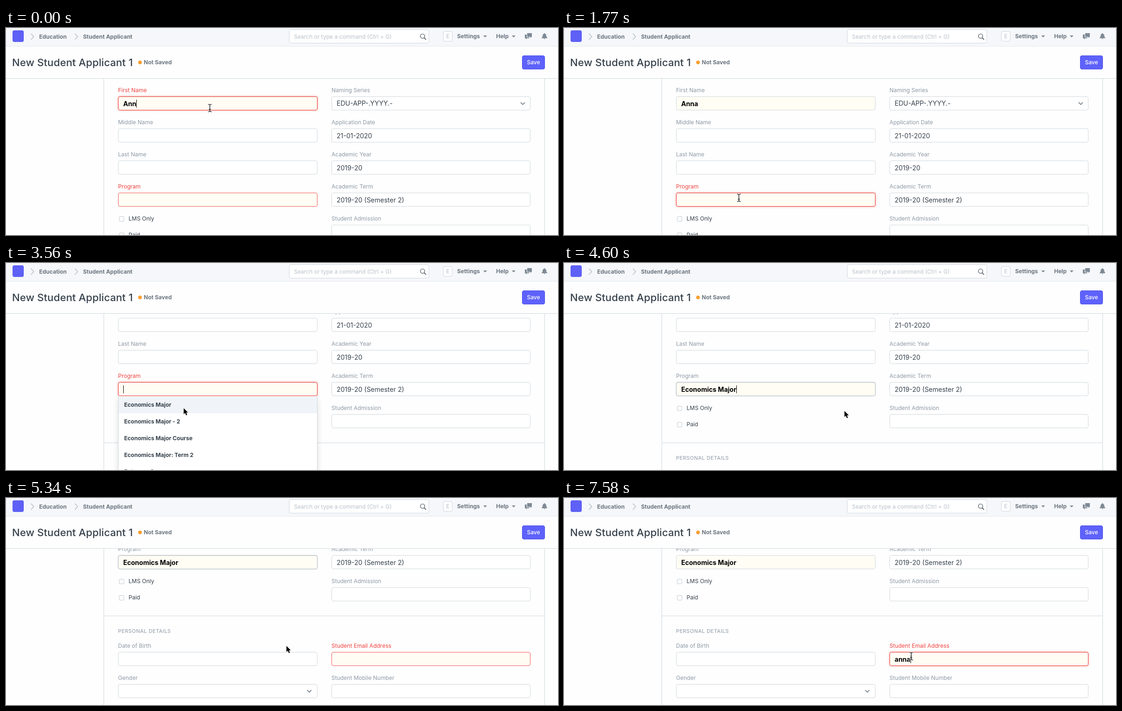
These frames come from a looping animation (1182 px wide and 445 px high, 8000 ms). An HTML page:

```html
<!DOCTYPE html>
<html lang="en">
<head>
<meta charset="utf-8">
<title>Student form</title>
<style>
  html, body { margin: 0; width: 100%; height: 100%; overflow: hidden; background: #fefefe; }
  body { font: 12px/20px Inter, "Open Sans", sans-serif; color: #36414c; cursor: default; }
  div, svg, .caret { position: absolute; box-sizing: border-box; }
  .text { white-space: pre; line-height: 20px; }
  .bold { font-weight: 700; color: #6c7680; }
  #stage { left: 0; top: 0; width: 1182px; height: 445px; overflow: hidden; background: #fefefe; }
  #bar { left: 0; top: 0; width: 1182px; height: 40px; background: #f5f7fa; border-bottom: 1px solid #e6eaee; }
  #head { left: 0; top: 40px; width: 1182px; height: 69px; border-bottom: 1px solid #d1d8dd; }
  #logo { left: 14px; top: 5px; width: 24px; height: 25px; border-radius: 4px; background: #5e60f6; }
  #search { left: 606px; top: 3px; width: 300px; height: 30px; border: 1px solid #d1d8dd; border-radius: 4px; background: #fff; }
  #avatar { left: 936px; top: 7px; width: 20px; height: 22px; border: 1px solid #d1d8dd; border-radius: 3px; background: #fdfdfe;
    color: #b8c2cc; text-align: center; line-height: 20px; }
  #save { left: 1105px; top: 59px; width: 49px; height: 30px; border-radius: 4px; background: #5e62fb; border: 1px solid #4f53e6;
    color: #fff; font-weight: 500; line-height: 28px; text-align: center; }
  #dot { left: 283px; top: 70px; width: 8px; height: 8px; border-radius: 50%; background: #f8a037; }
  #view { left: 0; top: 109px; width: 1182px; height: 336px; overflow: hidden; }
  #form { left: 0; top: -109px; width: 1182px; height: 800px; }
  #frame { left: 209px; top: 0; width: 945px; height: 800px; border: solid #d1d8dd; border-width: 0 1px; }
  #rule { left: 210px; top: 484px; width: 943px; height: 1px; background: #d1d8dd; }
  .label { color: #8d99a6; }
  .input { height: 30px; border: 1px solid #d1d8dd; border-radius: 4px; background: #fff; }
  .value { left: 10px; top: 0; height: 30px; line-height: 30px; font-size: 14px; white-space: pre; }
  .select .value { top: -1px; }
  .must { background: #fffdf4; }
  .must .value { font-weight: 700; color: #000; }
  .focus .input { border-color: #b3bfca; box-shadow: inset 0 1px 1px rgba(0,0,0,.06), 0 0 3px rgba(140,155,170,.35); }
  .error .label { color: #f0423f; }
  .error .input { border-color: #f25a56; }
  .error.focus .input { border-color: #ee3b37; box-shadow: inset 0 1px 1px rgba(0,0,0,.06), 0 0 4px rgba(240,70,60,.5); }
  .caret { top: 6px; width: 1px; height: 17px; background: #000; visibility: hidden; }
  .box { left: 242px; width: 11px; height: 11px; border: 1px solid #c3ccd4; border-radius: 2px; background: #fff; }
  #menu { left: 240px; top: 384px; width: 427px; height: 220px; padding: 1px 0; background: #fff; border: 1px solid #d1d8dd;
    border-top: 0; box-shadow: 0 6px 12px rgba(0,0,0,.13); }
  .row { left: 0; width: 425px; height: 36px; padding-left: 12px; line-height: 36px; font-weight: 700; white-space: pre; }
  .row.lit { background: #f0f4f8; }
  svg { left: 0; top: 0; overflow: visible; }
</style>
</head>
<body>
<div id="stage">
  <div id="view"><div id="form">
    <div id="frame"></div>
    <div id="rule"></div>
  </div></div>
  <div id="bar"></div>
  <div id="head"></div>
  <div id="logo"></div>
  <div id="search"></div>
  <div id="avatar">E</div>
  <div id="dot"></div>
  <div id="save">Save</div>
  <svg width="1182" height="109" fill="none">
    <g stroke="#b4bec8" stroke-width="1.4">
      <path d="M53.5 12l6 6.5l-6 6.5M147.500 12l6 6.500l-6 6.500"/>
    </g>
    <g stroke="#5b646d" stroke-width="1.4">
      <circle cx="892" cy="17.500" r="4.600"/><path d="M895.300 21l4.200 4.200" stroke-width="1.800"/>
    </g>
    <g fill="#7f8a95">
      <path d="M1022 16h8l-4 4.200zM1083 16h8l-4 4.200z"/>
      <path d="M1116 11h10v8h-1.500v2.500l-2.700-2.500h-5.800z"/>
      <path d="M1111 14h4v6h5.500v2h-4.500l-2.500 2.500v-2.500h-2.500z"/>
      <path d="M1153 11q1 0 1 1.200q3 1 3 4.500q0 3 2 4.600v.7h-12v-.7q2-1.600 2-4.600q0-3.500 3-4.500q0-1.200 1-1.200zM1151.500 22.500h3q-.3 1.600-1.500 1.600t-1.500-1.600z"/>
    </g>
  </svg>
  <svg id="pointer" width="1" height="1">
    <g id="beam" fill="none" stroke-linecap="round">
      <path d="M-3.500-8Q0-8 0-5.500Q0-8 3.500-8M0-5.500V5.500M-3.500 8Q0 8 0 5.500Q0 8 3.500 8M-2 3H2" stroke="#fff" stroke-width="2.600" opacity=".8"/>
      <path d="M-3.500-8Q0-8 0-5.500Q0-8 3.500-8M0-5.500V5.500M-3.500 8Q0 8 0 5.500Q0 8 3.500 8M-2 3H2" stroke="#000" stroke-width="1.200"/>
    </g>
    <path id="arrow" d="M0 0V13L3 10.200L5.200 15.400L7.400 14.500L5.300 9.400H9.300Z" fill="#000" stroke="#fff" paint-order="stroke" stroke-width="2"/>
    <g id="hand" stroke="#000" stroke-width="1.100" stroke-linejoin="round">
      <path fill="#fff" d="M-1.300 9V1.300a1.300 1.300 0 0 1 2.600 0V6a1.300 1.300 0 0 1 2.600 .3a1.300 1.300 0 0 1 2.500 .7a1.200 1.200 0 0 1 2.300 1V11.500Q8.700 13.500 7.600 15V16.600H.8V15.200Q-1 13.500-4.300 9.500C-5.600 7.600-3.500 6.400-1.300 9Z"/>
      <path d="M1.300 6v3M3.900 6.500v2.500M6.400 7.200v2M2.300 11v3M4.200 11v3M6.100 11v3" fill="none"/>
    </g>
  </svg>
</div>
<script>
const $ = id => document.getElementById(id);
const stage = $('stage'), form = $('form');

function add(parent, cls, css, text = '') {
  const el = document.createElement('div');
  el.className = cls;
  Object.assign(el.style, css);
  el.textContent = text;
  parent.append(el);
  return el;
}
const px = n => n + 'px';

// Text whose capitals are centred on y.
const write = (parent, cls, x, y, text, css = {}) =>
  add(parent, 'text ' + cls, { left: px(x), top: px(y - 10), ...css }, text);

write(stage, 'bold', 71, 18.5, 'Education');
write(stage, 'bold', 165, 18.5, 'Student Applicant');
write(stage, '', 616.5, 18.5, 'Search or type a command (Ctrl + G)', { color: '#b9c1c9' });
write(stage, 'bold', 966, 18, 'Settings');
write(stage, 'bold', 1049.5, 18, 'Help');
write(stage, '', 13, 74, 'New Student Applicant 1', { fontSize: '22px', fontWeight: 500, letterSpacing: '.1px' });
write(stage, 'bold', 295, 74, 'Not Saved');

const LEFT = 240, RIGHT = 697;
function field(x, y, label, value = '', kind = '') {
  const wrap = add(form, '', { left: 0, top: 0 });
  write(wrap, 'label', x, y - 13.5, label);
  const box = add(wrap, 'input ' + kind, { left: px(x), top: px(y), width: px(x === LEFT ? 427 : 426) });
  const val = add(box, 'value', {});
  const text = document.createElement('span');
  const caret = document.createElement('i');
  text.textContent = value;
  caret.className = 'caret';
  val.append(text, caret);
  if (kind === 'select') {
    box.insertAdjacentHTML('beforeend',
      '<svg width="426" height="28" fill="none" stroke="#7f8a95" stroke-width="1.8"><path d="M404 12l4.500 4.500l4.500-4.500"/></svg>');
  }
  return { wrap, text, caret };
}

const fields = {
  name: field(LEFT, 147, 'First Name', '', 'must'),
  program: field(LEFT, 354, 'Program', '', 'must'),
  email: field(RIGHT, 562, 'Student Email Address', '', 'must')
};
field(LEFT, 216, 'Middle Name');
field(LEFT, 285, 'Last Name');
field(LEFT, 562, 'Date of Birth');
field(LEFT, 631, 'Gender', '', 'select');
field(RIGHT, 147, 'Naming Series', 'EDU-APP-.YYYY.-', 'select');
field(RIGHT, 216, 'Application Date', '21-01-2020');
field(RIGHT, 285, 'Academic Year', '2019-20');
field(RIGHT, 354, 'Academic Term', '2019-20 (Semester 2)');
field(RIGHT, 423, 'Student Admission');
field(RIGHT, 631, 'Student Mobile Number');
[['LMS Only', 410], ['Paid', 445]].forEach(([text, y]) => {
  add(form, 'box', { top: px(y - 5) });
  write(form, '', 262.5, y, text);
});
write(form, 'label', LEFT, 517, 'PERSONAL DETAILS', { fontSize: '11px', letterSpacing: '.45px' });

const menu = add(form, '', {});
menu.id = 'menu';
const rows = ['Economics Major', 'Economics Major - 2', 'Economics Major Course', 'Economics Major: Term 2', 'Entrance Course', 'Finance Major']
  .map((text, i) => add(menu, 'row', { top: px(1 + i * 36) }, text));

// Each step changes part of the state; everything else carries over.
const LOOP = 8000;
const start = {
  at: [436, 172], cursor: 'beam', scroll: 0, focus: 'name', caret: true,
  name: 'Ann', program: '', email: '', errors: ['name', 'program', 'email'], menu: false, hover: 0
};
const steps = [
  [150, { name: 'Anna' }],
  [440, { at: [426, 290] }],
  [590, { at: [400, 394], cursor: 'arrow', caret: false }],
  [890, { at: [384, 378], cursor: 'beam' }],
  [1040, { at: [374, 365], caret: true }],
  [1190, { focus: 'program' }],
  [1330, { errors: ['program', 'email'] }],
  [1770, { caret: false }],
  [2220, { scroll: 72, caret: true, menu: true, hover: 1, cursor: 'hand' }],
  [2370, { scroll: 98 }],
  [2520, { hover: 2 }],
  [2660, { at: [377, 338], hover: 1 }],
  [2810, { at: [380, 312], hover: 0, caret: false }],
  [3260, { caret: true }],
  [3560, { cursor: 'arrow' }],
  [3710, { menu: false, program: 'Economics Major' }],
  [3860, { at: [440, 314], errors: ['email'] }],
  [4000, { at: [550, 317] }],
  [4150, { at: [600, 318], caret: false }],
  [4600, { caret: true }],
  [5040, { scroll: 150, caret: false }],
  [5190, { scroll: 215 }],
  [5340, { scroll: 231 }],
  [5640, { at: [640, 323] }],
  [5790, { at: [715, 337], cursor: 'beam' }],
  [5930, { at: [743, 340] }],
  [6080, { focus: 'email', caret: true }],
  [6680, { caret: false }],
  [6980, { email: 'a', caret: true }],
  [7280, { email: 'an' }],
  [7430, { email: 'ann' }],
  [7580, { email: 'anna' }]
];

function stateAt(t) {
  const state = { ...start };
  for (const [time, change] of steps) {
    if (time > t) break;
    Object.assign(state, change);
  }
  return state;
}

function draw(s) {
  form.style.transform = `translateY(${-s.scroll}px)`;
  for (const key in fields) {
    const { wrap, text, caret } = fields[key];
    const focused = s.focus === key;
    wrap.classList.toggle('focus', focused);
    wrap.classList.toggle('error', s.errors.includes(key));
    text.textContent = s[key];
    caret.style.visibility = focused && s.caret ? 'visible' : 'hidden';
  }
  menu.style.display = s.menu ? '' : 'none';
  rows.forEach((row, i) => row.classList.toggle('lit', i === 0 || i === s.hover));
  $('pointer').style.transform = `translate(${s.at[0] + .5}px, ${s.at[1]}px)`;
  for (const shape of ['beam', 'arrow', 'hand']) $(shape).style.display = s.cursor === shape ? '' : 'none';
}

const begin = performance.now();
function tick() {
  draw(stateAt((performance.now() - begin) % LOOP));
  requestAnimationFrame(tick);
}
tick();
</script>
</body>
</html>
```
